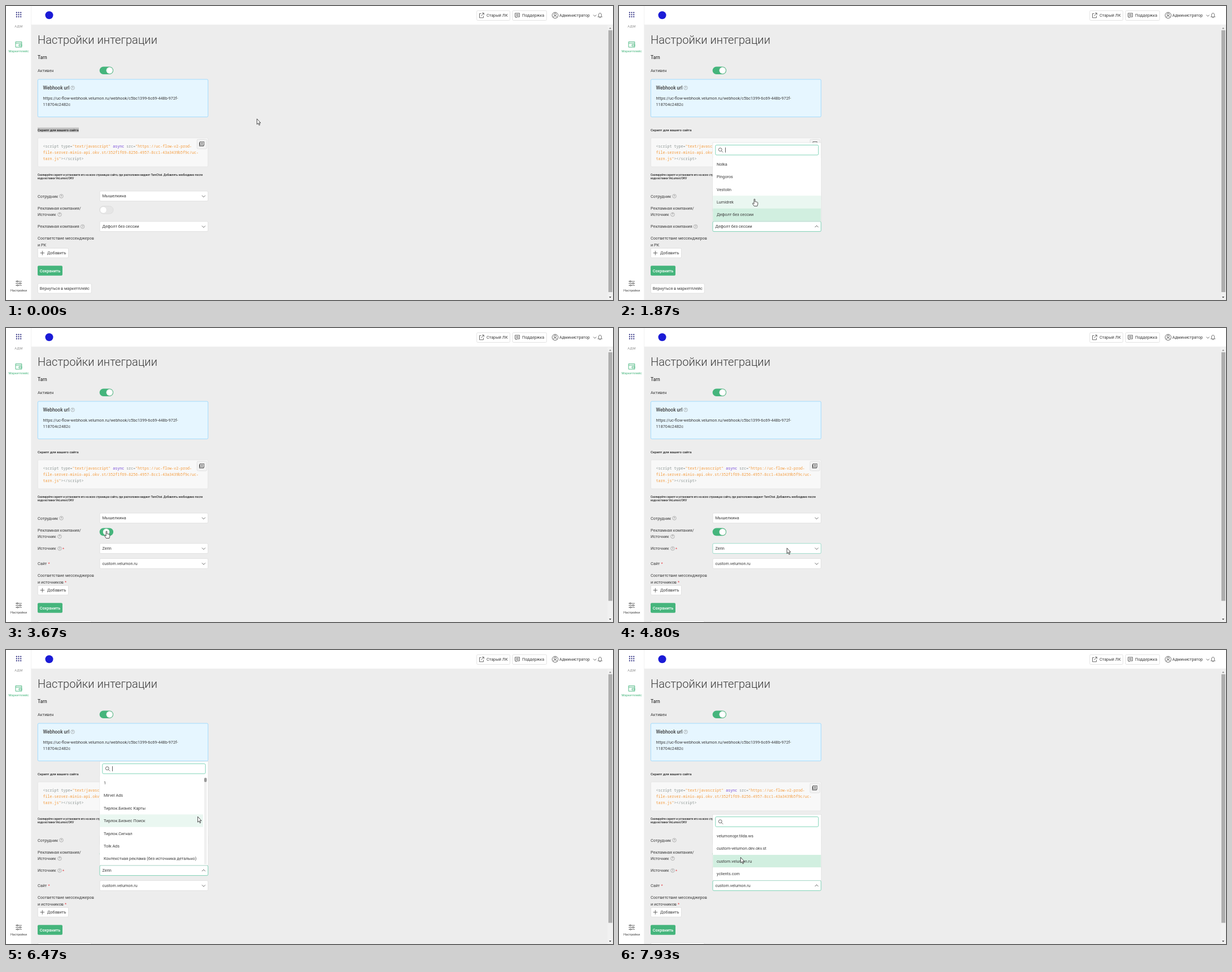
Write an HTML page that moves like this. It is 1075 px wide and 521 px high and loops after 8 s.

```html
<!DOCTYPE html>
<html lang="ru">
<head>
<meta charset="utf-8">
<title>Настройки интеграции</title>
<style>
  html, body { margin: 0; width: 100%; height: 100%; overflow: hidden; background: #ededed; }
  svg { display: block; width: 1075px; height: 521px; }
  text { font-family: Roboto, sans-serif; font-size: 7.28px; fill: #3c3c3c; white-space: pre; }
  .code { font-family: "Noto Sans Mono", "DejaVu Sans Mono", monospace; font-size: 6.67px; fill: #8f9896; }
  .str { fill: #f39a3c; }
  .key { fill: #7448d8; }
  .line { fill: none; stroke: #444; stroke-width: .8; }
  .red { fill: #e5484d; }
</style>
</head>
<body>
<svg id="stage" viewBox="0 0 1075 521" xmlns="http://www.w3.org/2000/svg"></svg>
<script>
const LOOP = 8000;
const GREEN = '#45b57c', OPEN = '#62c9a8', HOVER = '#8ad6c0', BORDER = '#dcdcdc';

// Drawing helpers
const text = (x, y, s, attrs = '') => `<text x="${x}" y="${y}" ${attrs}>${s}</text>`;
const rect = (x, y, w, h, fill, attrs = '') =>
  `<rect x="${x}" y="${y}" width="${w}" height="${h}" fill="${fill}" ${attrs}/>`;
const box = (x, y, w, h, fill = '#fff', stroke = BORDER, attrs = '') =>
  rect(x, y, w, h, fill, `rx="2" stroke="${stroke}" stroke-width=".8" ${attrs}`);
const circle = (x, y, r, attrs) => `<circle cx="${x}" cy="${y}" r="${r}" ${attrs}/>`;
const path = (d, attrs = 'class="line"') => `<path d="${d}" ${attrs}/>`;
const group = (id, body, attrs = '') => `<g id="${id}" ${attrs}>${body}</g>`;
const help = (x, y) => circle(x, y, 3.3, 'fill="none" stroke="#8a8a8a" stroke-width=".6"') +
  text(x, y + 1.8, '?', 'text-anchor="middle" style="font-size:5px;fill:#777"');
const star = (x, y) => text(x, y, '*', 'class="red"');
const span = (cls, s) => `<tspan class="${cls}">${s}</tspan>`;

const select = (id, cy, value) => group(id,
  box(166, cy - 9, 191.8, 17.8) + text(170.5, cy + 2.4, value) +
  path(`M347 ${cy - 1.3}l3 3 3-3`, `class="line chevron" style="transform-origin:350px ${cy}px"`));

const toggle = (id, cy) => group(id,
  rect(165.7, cy - 6.8, 24.4, 13.6, GREEN, 'class="track" rx="6.8"') +
  circle(183.4, cy, 5.7, 'class="knob" fill="#fff" stroke="#ccc" stroke-width=".3"'));

const ROW = 22.4;

// Option panel that opens upwards from the select centred at cy
function panel(id, cy, items, chosen, long) {
  const first = cy - 21 - ROW * (items.length - 1), sy = first - 25;
  const width = long ? 182.5 : 191.2;
  const rows = items.map((s, i) => {
    const y = first + ROW * i;
    return rect(166.4, y - 11.2, width, ROW, i === chosen ? '#d1efe0' : '#fff', 'class="row"') +
      text(173, y + 2.5, s);
  }).join('');
  const search = box(170.8, sy - 8.8, 182.4, 17.6, '#fff', OPEN) +
    circle(179.3, sy - .7, 2.9, 'class="line"') + path(`M181.4 ${sy + 1.4}l2.8 2.8`) +
    rect(188, sy - 4.5, .8, 9, '#333', 'class="caret"');
  return group(id,
    rect(166, sy - 13.2, 192, cy - 9.5 - sy + 13.2, '#fff', 'stroke="#d6d6d6" stroke-width=".5"') +
    rows + (long ? rect(351, first - 9, 4.5, cy - 2 - first, '#f0f0f0') +
      rect(351, first - 9, 4.5, 7.5, '#999', 'rx="2"') : '') +
    `<g class="search">${search}</g>`);
}

const dots = [18.8, 22.5, 26.2].map(x =>
  [11.7, 15.4, 19.1].map(y => circle(x, y, 1.1, 'fill="#25257c"')).join('')).join('');

const sidebar = rect(0, 0, 45, 521, '#fff') + rect(44.5, 0, .5, 521, '#e4e4e4') + dots +
  text(22.6, 38.2, 'АДМ', 'text-anchor="middle" style="font-size:5.7px;fill:#888;letter-spacing:.5px"') +
  path('M17 63.4h10.8v9.6H17zM17 66h10.8M23 68.3h4.8v2.6H23z', `fill="none" stroke="${GREEN}" stroke-width=".9"`) +
  text(22.4, 81.6, 'Маркетплейс', `text-anchor="middle" style="font-size:5.7px;fill:${GREEN}"`) +
  path('M17 488h11M17 491.5h11M17 495h11') +
  [[20, 488], [25, 491.5], [20.5, 495]].map(([x, y]) => circle(x, y, 1.2, 'fill="#fff" stroke="#444" stroke-width=".8"')).join('') +
  text(22.5, 505.6, 'Настройки', 'text-anchor="middle" style="font-size:5.7px"');

const header = rect(45, 0, 1030, 33.5, '#fff') + rect(45, 33.3, 1030, .5, '#e2e2e2') +
  circle(76.5, 16.2, 7, 'fill="#1b1bd6"') +
  box(833.7, 8.2, 58.8, 17.3) + text(851, 19.4, 'Старый ЛК') +
  path('M841.5 13.5h-3v7.3h7v-3.2M841.5 17.7l4.7-5.2M843 12.5h3.3v3.3') +
  box(897, 8.2, 60.5, 17.3) + text(914, 19.4, 'Поддержка') +
  path('M901.5 12.8h8v6.4h-4.5l-1.8 1.8v-1.8h-1.7zM903 15h5M903 17h5') +
  circle(972.5, 16.5, 5.3, 'class="line"') + circle(972.5, 14.8, 2, 'class="line"') +
  path('M968.8 20.2c1-3.3 6.4-3.3 7.4 0') +
  text(980, 19.2, 'Администратор') + path('M1040.2 15.7l2.6 2.6 2.6-2.6') +
  path('M1048.3 19.2c1.5-1 1-2.3 1.3-4 .5-3.4 4.3-3.4 4.8 0 .3 1.7-.2 3 1.3 4zM1051 20.7h2');

const scrollbar = rect(1065.5, 34, 9.5, 487, '#f1f1f1') +
  rect(1066.8, 43, 7, 464, '#aeaeae', 'id="thumb"') +
  path('M1068 40.5h4l-2-2.5z', 'fill="#888"') + path('M1068 515h4l-2 2.5z', 'fill="#444"');

const strong = 'style="font-size:8.4px;font-weight:500"';
const small = 'style="font-size:4.88px;font-weight:500;fill:#222"';

const intro =
  text(56, 67.3, 'Настройки интеграции', 'style="font-size:20.16px;font-weight:300"') +
  text(56, 93.5, 'Tarn', strong) + text(56, 116.6, 'Активен') + toggle('active', 114.2) +
  box(56.3, 130, 301.5, 66.6, '#e6f6ff', '#91d5ff') +
  text(65.5, 147.8, 'Webhook url', strong) + help(118, 145) +
  text(65.5, 165.6, 'https://uc-flow-webhook.velumon.ru/webhook/c5bc1399-6c69-448b-972f-') +
  text(65.5, 176.9, '118704c2482c') +
  rect(56, 215.5, 73, 8, '#bfbfbf', 'id="mark"') +
  text(56, 221.7, 'Скрипт для вашего сайта', 'style="font-size:6.04px;font-weight:500;fill:#222"') +
  box(56.3, 233.8, 301.5, 51.2, '#f8f8f8', '#e3e3e3') +
  text(65.5, 250.8, '&lt;script type=' + span('str', '"text/javascript"') + ' ' + span('key', 'async') +
    ' src=' + span('str', '"https://uc-flow-v2-prod-'), 'class="code"') +
  text(65.5, 261.8, span('str', 'file-server-minio-api.okv.st/352f1f69-8256-4957-8cc1-43a3439b5f9c/uc-'), 'class="code"') +
  text(65.5, 272.7, span('str', 'tarn.js"') + '&gt;&lt;/script&gt;', 'class="code"') +
  box(338.3, 236.3, 17.4, 16.8, '#f3f3f3') +
  path('M343.5 246.8V240.6h7.3v6.2zM345 242.5h4.3M345 244.5h4.3M343.5 242h-1v6.3h7.3v-1.5') +
  text(56, 301.1, 'Скопируйте скрипт и установите его на всех страницах сайта, где расположен виджет TarnChat. Добавлять необходимо после', small) +
  text(56, 306.7, 'кода вставки VeLumon/OKV', small);

const form =
  text(56, 339.5, 'Сотрудник') + help(98, 337) + select('staff', 337, 'Мышелкина') +
  text(56, 360.5, 'Рекламная компания/') + text(56, 372, 'Источник') + help(95, 369.5) +
  toggle('mode', 361.4) +
  group('campaignForm', text(56, 393.2, 'Рекламная компания') + help(135.6, 390.8) +
    select('campaign', 390.8, 'Дефолт без сессии') +
    text(56, 414.3, 'Соответствие мессенджеров') + text(56, 425.6, 'и РК')) +
  group('sourceForm', text(56, 393.2, 'Источник') + help(95, 390.8) + star(100, 393.5) +
    select('source', 390.8, 'Zerin') +
    text(56, 420, 'Сайт') + star(74.5, 420.3) + select('site', 417.6, 'custom.velumon.ru') +
    text(56, 441.2, 'Соответствие мессенджеров') + text(56, 452.5, 'и источников') + star(104, 452.8)) +
  group('footer',
    box(56.3, 429.2, 54.2, 17) + path('M60.5 437.7h7.6M64.3 433.9v7.6') + text(73, 440.2, 'Добавить') +
    rect(56, 460.2, 44, 17.6, GREEN, 'rx="2"') +
    text(78, 471.7, 'Сохранить', 'text-anchor="middle" style="fill:#fff;font-weight:500"') +
    box(56.3, 491.8, 95, 17.2) + text(103.8, 503, 'Вернуться в маркетплейс', 'text-anchor="middle"'));

const lists = [
  { id: 'campaignList', field: 'campaign', cy: 390.8, from: 1470, to: 2730, chosen: 4,
    items: ['Nolka', 'Pingoros', 'Vestolin', 'Lumidrek', 'Дефолт без сессии'] },
  { id: 'sourceList', field: 'source', cy: 390.8, from: 4930, to: 6670, chosen: -1, long: true,
    items: ['1', 'Mirvel Ads', 'Тирлок.Бизнес Карты', 'Тирлок.Бизнес Поиск', 'Тирлок.Сигнал', 'Tolk Ads',
      'Контекстная реклама (без источника детально)'] },
  { id: 'siteList', field: 'site', cy: 417.6, from: 7200, to: LOOP, chosen: 2,
    items: ['velumonopr.tilda.ws', 'custom-velumon.dev.okv.st', 'custom.velumon.ru', 'yclients.com'] }
];

const pointer = 'fill="#fff" stroke="#222" stroke-width=".8" stroke-linejoin="round"';
const cursors =
  path('M.4 .4V10.2L2.6 8.2 4.2 11.8 5.7 11.1 4.1 7.7H7Z', `id="arrow" ${pointer}`) +
  path('M-.9 .8C-.9-.3.9-.3.9.8V5C1.3 4.4 2.5 4.6 2.6 5.4 3.2 4.8 4.1 5 4.3 5.8 5 5.4 5.8 5.8 5.8 6.6V9.3L4.8 12.6H-.6L-3.4 8.6C-4 7.6-2.8 6.8-2 7.6L-.9 8.6Z', `id="hand" ${pointer}`);

const stage = document.getElementById('stage');
stage.innerHTML = rect(0, 0, 1075, 521, '#ededed') + intro + form +
  lists.map(l => panel(l.id, l.cy, l.items, l.chosen, l.long)).join('') +
  header + sidebar + scrollbar + group('cursor', cursors);

const $ = id => document.getElementById(id);
const show = (el, on) => { el.style.display = on ? '' : 'none'; };

// Pointer stops: time, x, y
const stops = [
  [0, 444, 199.5], [130, 444, 199.5], [600, 147, 347], [800, 147, 347], [1330, 290, 390], [1500, 290, 390],
  [1870, 240, 342], [2470, 222, 370], [2730, 222, 370], [3270, 178, 360], [3670, 178, 360],
  [4470, 297, 389.5], [5130, 297, 389.5], [5730, 223, 266], [6270, 223, 266], [6600, 400, 310],
  [6670, 400, 310], [7070, 336, 419], [7200, 336, 419], [7930, 215, 367], [LOOP, 215, 367]
];
const TOGGLE_AT = 3600;

function pointerAt(t) {
  const i = stops.findIndex(s => s[0] > t);
  const [t0, x0, y0] = stops[i - 1], [t1, x1, y1] = stops[i];
  const p = (t - t0) / (t1 - t0), e = p * p * (3 - 2 * p);
  return [x0 + (x1 - x0) * e, y0 + (y1 - y0) * e];
}

function draw(t) {
  const [x, y] = pointerAt(t);
  $('cursor').setAttribute('transform', `translate(${x.toFixed(1)} ${y.toFixed(1)})`);
  const hand = t >= 1600 && t < 2800 || t >= 3200 && t < 3860;
  show($('hand'), hand);
  show($('arrow'), !hand);
  show($('mark'), t < 870);

  const on = t >= TOGGLE_AT;
  const slide = Math.max(0, Math.min(1, (t - TOGGLE_AT) / 150));
  $('mode').querySelector('.knob').setAttribute('cx', 172.4 + 11 * slide);
  const track = $('mode').querySelector('.track');
  track.setAttribute('fill', on ? GREEN : '#e6e6e6');
  track.setAttribute('stroke', on ? 'none' : '#dedede');
  show($('campaignForm'), !on);
  show($('sourceForm'), on);
  $('footer').setAttribute('transform', `translate(0 ${on ? 27 : 0})`);
  $('thumb').setAttribute('height', on ? 440.5 : 464);

  for (const l of lists) {
    const open = t >= l.from && t < l.to, ready = open && t - l.from >= 60;
    const list = $(l.id), field = $(l.field);
    show(list, open);
    show(list.querySelector('.search'), ready);
    show(list.querySelector('.caret'), Math.floor((t - l.from - 70) / 530) % 2 === 0);
    const over = Math.abs(y - l.cy) < 9 && x > 166 && x < 358;
    field.firstChild.setAttribute('stroke', open ? OPEN : over ? HOVER : BORDER);
    field.querySelector('.chevron').style.transform = ready ? 'rotate(180deg)' : '';
    const first = l.cy - 21 - ROW * (l.items.length - 1);
    const under = x > 166 && x < 358 ? Math.round((y - first) / ROW) : -1;
    list.querySelectorAll('.row').forEach((r, i) =>
      r.setAttribute('fill', i === l.chosen ? '#d1efe0' : i === under ? '#eaf7f1' : '#fff'));
  }
}

// The screen updates fifteen times a second
function tick() {
  const t = performance.now() % LOOP;
  draw(Math.min(LOOP - 1, Math.round(Math.floor((t + 5) * 3 / 200) * 20 / 3) * 10));
  requestAnimationFrame(tick);
}
tick();
</script>
</body>
</html>
```
